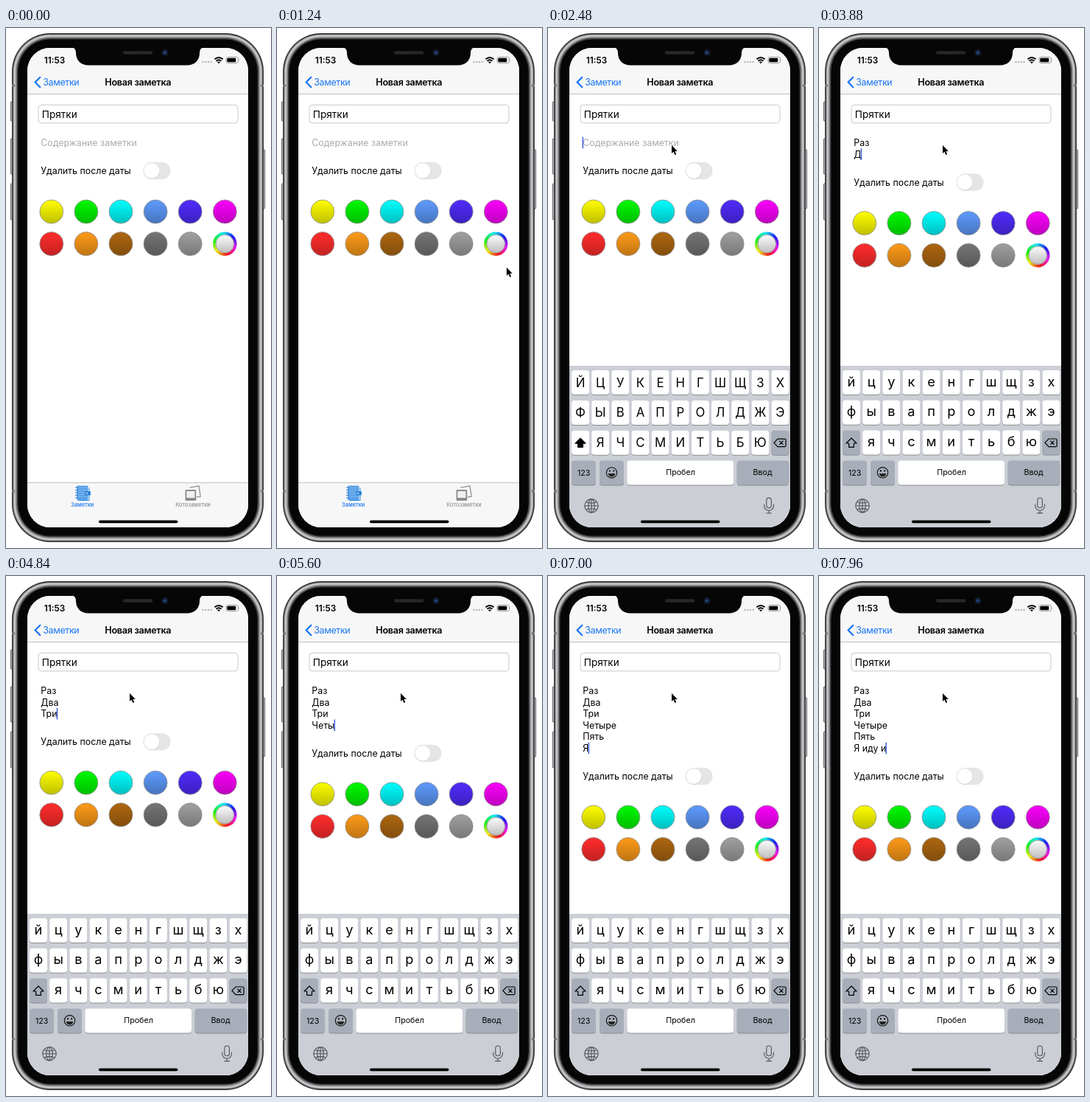
Animation, 360 px wide and 705 px high, one loop 8 s. Source, as an HTML page:

```html
<!DOCTYPE html>
<html lang="ru">
<head>
<meta charset="utf-8">
<title>Новая заметка</title>
<style>
  html, body { margin: 0; width: 100%; height: 100%; overflow: hidden; background: #fff; }
  svg { display: block; width: 100vw; height: 100vh; }
  text { font-family: Inter, "Open Sans", sans-serif; white-space: pre; }
  .mid { text-anchor: middle; }
  .body { font-size: 12.4px; }
  .upper { font-size: 16.8px; }
  .lower { font-size: 18.2px; }
  .hint { font-size: 10.7px; }
  .tab { font-size: 7.4px; font-weight: 500; }
  #keyboard { animation: rise 8s infinite; }
  #pointer { animation: arrive 8s infinite; }
  @keyframes rise {
    0%, 25.11% { transform: translateY(219px); animation-timing-function: cubic-bezier(.38, .7, .125, 1); }
    31.36%, 100% { transform: none; }
  }
  @keyframes arrive {
    0%, 15% { transform: translate(165px, 190px); animation-timing-function: ease-out; }
    21.5%, 100% { transform: none; }
  }
</style>
</head>
<body>
<svg viewBox="0 0 360 705">
  <defs>
    <clipPath id="screenClip"><rect x="29" y="27" width="300" height="650" rx="31"/></clipPath>
    <linearGradient id="shade" x2="0" y2="1">
      <stop offset=".1" stop-opacity="0"/><stop offset="1" stop-opacity=".23"/>
    </linearGradient>
  </defs>

  <g id="phone">
    <g fill="#c4c4c6" stroke="#3c3c3e" stroke-width=".8">
      <rect x="6.4" y="100" width="4" height="26" rx="1"/>
      <rect x="6.4" y="150" width="4" height="48" rx="1"/>
      <rect x="6.4" y="211" width="4" height="49" rx="1"/>
      <rect x="347.6" y="165" width="4" height="80" rx="1"/>
    </g>
    <g id="body"></g>
    <path d="M8 78h4M346 78h4M8 628h4M346 628h4" stroke="#77777a" stroke-width="3"/>
  </g>

  <g clip-path="url(#screenClip)">
    <rect x="29" y="27" width="300" height="650" fill="#fff"/>

    <g id="navigation">
      <rect x="29" y="27" width="300" height="62.5" fill="#f7f7f7"/>
      <path d="M29 89.5h300" stroke="#bcbcbc" stroke-width=".9"/>
      <path d="M46.3 66.8 39.7 73.5l6.6 6.8" fill="none" stroke="#1674f2" stroke-width="2.2" stroke-linecap="round"/>
      <text x="50.3" y="78" font-size="12.4" letter-spacing="-.35" fill="#1674f2">Заметки</text>
      <text class="mid" x="179.3" y="78" font-size="12.6" font-weight="600" letter-spacing="-.3">Новая заметка</text>
    </g>

    <g id="status">
      <text x="51.8" y="48" font-size="11.8" font-weight="600">11:53</text>
      <path d="M267.5 46h13" stroke="#b9b9b9" stroke-width="2.6" stroke-linecap="round" stroke-dasharray="0 3.7"/>
      <path d="M283.4 42.3q5.6-4.8 11.2 0M285.5 44.7q3.5-2.8 7 0" fill="none" stroke="#000" stroke-width="1.9"/>
      <path d="M287 46.2q2-1.5 4 0l-2 2z"/>
      <rect x="299" y="39.4" width="16.5" height="8.2" rx="2.4" fill="none" stroke="#888" stroke-width=".8"/>
      <rect x="300.3" y="40.7" width="12" height="5.6" rx="1.2"/>
      <path d="M316.4 42.2q1.2 1.3 0 2.6z" fill="#888"/>
    </g>

    <rect x="44" y="104.3" width="271" height="24.6" rx="4" fill="#fff" stroke="#c8c8c8"/>
    <text x="48.8" y="121.5" font-size="13.6">Прятки</text>
    <text id="placeholder" class="body" x="47.3" y="160" fill="#aaaaad">Содержание заметки</text>
    <g id="note" class="body"></g>
    <rect id="caret" width="1.6" height="15.6" fill="#4566dd"/>

    <g id="options">
      <text class="body" x="47.3" y="198.3">Удалить после даты</text>
      <rect x="186.4" y="182" width="37.2" height="23.2" rx="11.6" fill="#e5e5e6"/>
      <circle cx="198.4" cy="194.4" r="10.4" fill="#000" opacity=".1"/>
      <circle cx="198" cy="193.6" r="10.4" fill="#fff"/>
      <g id="palette"></g>
    </g>

    <g id="tabs">
      <rect x="29" y="616.5" width="300" height="61" fill="#f7f7f7"/>
      <path d="M29 616.5h300" stroke="#bdbdbd" stroke-width=".9"/>
      <rect x="96" y="620.5" width="15.5" height="19.5" rx="1.5" fill="#59a1e8"/>
      <path d="M98 623.5h12M98 626.5h12M98 629.5h12M98 632.5h12M98 635.5h12" stroke="#89bff2" stroke-width=".7"/>
      <path d="M94 623h4M94 626.5h4M94 630h4M94 633.5h4M94 637h4" stroke="#347fc7" stroke-width="1.1"/>
      <path d="M98 640.5h15v-17" fill="none" stroke="#2e8ce6" stroke-width="1"/>
      <rect x="107.5" y="628" width="7.5" height="5.5" rx="1" fill="#2c83da"/>
      <circle cx="110" cy="630.8" r="1" fill="#dcefff"/>
      <text class="tab mid" x="103.7" y="649.2" fill="#1674f2">Заметки</text>
      <path d="M249.5 623.2 262 620.8l2.2 14.4-5.5 1" fill="#f7f7f7" stroke="#929292" stroke-width="1.3"/>
      <rect x="243.6" y="626" width="14.6" height="14.8" rx="1" fill="#868686"/>
      <rect x="245.3" y="627.9" width="11.2" height="9.2" fill="#f0f0f0"/>
      <text class="tab mid" x="254" y="649.2" fill="#929292">Котозаметки</text>
    </g>

    <g id="keyboard"></g>

    <g id="pointer">
      <path d="M168 158.9v11.2l2.5-2.3 1.8 4.2 1.9-.8-1.8-4.1h3.5z" stroke="#fff" stroke-width=".8" paint-order="stroke"/>
    </g>
    <rect x="126" y="667.4" width="107.4" height="3.8" rx="1.9"/>
    <path d="M87 26q8 0 8 8c0 10 7 16.5 17 16.5h134c10 0 17-6.5 17-16.5q0-8 8-8z" fill="#060606"/>
  </g>

  <rect x="158.5" y="31" width="41" height="5" rx="2.5" fill="#1d1d1e"/>
  <path d="M161 33.5h37" stroke="#343436" stroke-width="2.6" stroke-dasharray="1 1"/>
  <circle cx="216" cy="33.5" r="5" fill="#11151f"/>
  <circle cx="216" cy="33.5" r="2.6" fill="#18305f"/>
  <circle cx="215.4" cy="33" r="1" fill="#3d66a8"/>
</svg>

<script>
const LOOP = 8000, TYPE_START = 3160, KEY_DELAY = 158, LINE = 15.6;
const CARET_ON = 1980, BLINK = [2620, 2960];
const NOTE = 'Раз\nДва\nТри\nЧетыре\nПять\nЯ иду и';
const GREY = '#a7aeb9', PITCH = 27.15, ROW = 40.8;
const $ = id => document.getElementById(id);

// Metal rim: nested outlines from the outer edge to the black bezel.
const RIM = ['#2c2c2e', '#8c8c8f', '#d2d2d5', '#b0b0b3', '#77777a', '#3c3c3f', '#060606'];
$('body').innerHTML = RIM.map((color, i) => {
  const inset = 1.4 * i;
  return `<rect x="${8 + inset}" y="${7 + inset}" width="${342 - 2 * inset}" height="${690 - 2 * inset}"
    rx="${52 - inset}" fill="${color}"/>`;
}).join('');

const COLORS = ['#f8f800', '#00f500', '#00f8f8', '#5c97f7', '#4e2af6', '#f500f5',
                '#fb2b2b', '#f89718', '#a9640f', '#727272', '#9c9c9c'];

function swatch(i, radius, fill) {
  const at = `cx="${61.8 + 47.1 * (i % 6)}" cy="${i < 6 ? 249 : 292.6}" r="${radius}"`;
  return `<circle ${at} fill="${fill}"/><circle ${at} fill="url(#shade)" stroke="#909090" stroke-width=".8"/>`;
}

function rainbow(cx, cy) {
  const step = Math.PI / 18, r = 14.3;
  const point = a => `${cx + r * Math.sin(a)} ${cy - r * Math.cos(a)}`;
  return Array.from({ length: 36 }, (_, i) =>
    `<path d="M${point(i * step)}A${r} ${r} 0 0 1 ${point((i + 1.1) * step)}"
      fill="none" stroke="hsl(${195 + i * 10} 85% 50%)" stroke-width="3.8"/>`).join('');
}

$('palette').innerHTML = COLORS.map((c, i) => swatch(i, 16, c)).join('') +
  rainbow(297.3, 292.6) + swatch(11, 12.2, '#f6f6f6');

function key(x, y, width, fill = '#fff', id = '') {
  const box = `x="${x}" width="${width}" height="33" rx="4"`;
  return `<rect ${box} y="${y + 1}" fill="#8b8e94"/><rect ${id && `id="${id}"`} ${box} y="${y}" fill="${fill}"/>`;
}

function letters(row, r) {
  return [...row].map((ch, i) => {
    const x = 44 + PITCH * (i + (r === 2)), y = 464 + ROW * r;
    return key(x - 12, y, 24) +
      `<text class="letter mid" x="${x}" data-y="${y}">${ch}</text>`;
  }).join('');
}

$('keyboard').innerHTML = `
  <rect x="29" y="458" width="300" height="220" fill="#cbced5"/>
  ${['ЙЦУКЕНГШЩЗХ', 'ФЫВАПРОЛДЖЭ', 'ЯЧСМИТЬБЮ'].map(letters).join('')}
  ${key(32, 545.6, 24, '#fff', 'shiftKey')}
  <path id="shiftIcon" d="M44 556 51 563h-3.6v5.3h-6.8V563H37z" stroke="#000" stroke-width="1.2" stroke-linejoin="round"/>
  ${key(303.5, 545.6, 24, GREY)}
  <path d="M307 562.2l5-5.2h9.5q1.6 0 1.6 1.6v7.4q0 1.6-1.6 1.6H312zM314.4 559.6l5.2 5.2m0-5.2-5.2 5.2" fill="none" stroke="#000" stroke-width="1.2"/>
  ${key(32, 586.4, 33, GREY)}${key(70, 586.4, 33, GREY)}${key(107.3, 586.4, 144.7)}${key(256.7, 586.4, 70.5, GREY)}
  <text class="hint mid" x="48.7" y="606.6">123</text>
  <text class="hint mid" x="180" y="606.2">Пробел</text>
  <text class="hint mid" x="291.5" y="606.2">Ввод</text>
  <circle cx="86.5" cy="602.8" r="7.2" fill="none" stroke="#111" stroke-width="1.1"/>
  <path d="M81.8 604h9.4q-.6 4.4-4.7 4.4t-4.7-4.4z" fill="#222"/>
  <circle cx="83.9" cy="600.4" r="1.1"/><circle cx="89.1" cy="600.4" r="1.1"/>
  <g fill="none" stroke="#505359" stroke-width="1.1">
    <circle cx="59" cy="647.7" r="9.2"/><ellipse cx="59" cy="647.7" rx="4.3" ry="9.2"/>
    <path d="M59 638.5v18.4M49.8 647.7h18.4M51.5 642.4q7.5 3.2 15 0M51.5 653q7.5-3.2 15 0"/>
    <rect x="296.8" y="637" width="6.6" height="13.5" rx="3.3"/>
    <path d="M293.7 645.5v2.3a6.4 6.4 0 0 0 12.8 0v-2.3M300.1 654.2v3.4M296.3 657.6h7.6"/>
  </g>`;

$('note').innerHTML = NOTE.split('\n').map((_, i) => `<text x="47.3" y="${160 + LINE * i}"></text>`).join('');
const rows = [...$('note').children];
const caps = [...document.querySelectorAll('.letter')];

function setCase(upper) {
  for (const cap of caps) {
    const ch = cap.textContent;
    cap.textContent = upper ? ch.toUpperCase() : ch.toLowerCase();
    cap.setAttribute('class', `letter mid ${upper ? 'upper' : 'lower'}`);
    cap.setAttribute('y', +cap.dataset.y + (upper ? 22.5 : 21.6));
  }
  $('shiftKey').setAttribute('fill', upper ? '#fff' : GREY);
  $('shiftIcon').setAttribute('fill', upper ? '#000' : 'none');
}

function showTyped(count) {
  const typed = NOTE.slice(0, count), lines = typed.split('\n'), last = lines.length - 1;
  rows.forEach((row, i) => row.textContent = lines[i] || '');
  const width = lines[last] ? rows[last].getComputedTextLength() : 0;
  $('caret').setAttribute('x', 46.5 + width);
  $('caret').setAttribute('y', 147.7 + LINE * last);
  $('placeholder').style.display = count ? 'none' : '';
  $('options').setAttribute('transform', `translate(0 ${LINE * last})`);
  setCase(!count || typed.endsWith('\n'));
}

let start, shown = -1;
function draw(now) {
  start ??= now;
  const t = (now - start) % LOOP;
  const count = Math.min(NOTE.length, Math.max(0, Math.floor((t - TYPE_START) / KEY_DELAY) + 1));
  if (count !== shown) showTyped(shown = count);
  const lit = t >= CARET_ON && !(t > BLINK[0] && t < BLINK[1]);
  $('caret').style.display = lit ? '' : 'none';
  requestAnimationFrame(draw);
}
requestAnimationFrame(draw);
</script>
</body>
</html>
```
